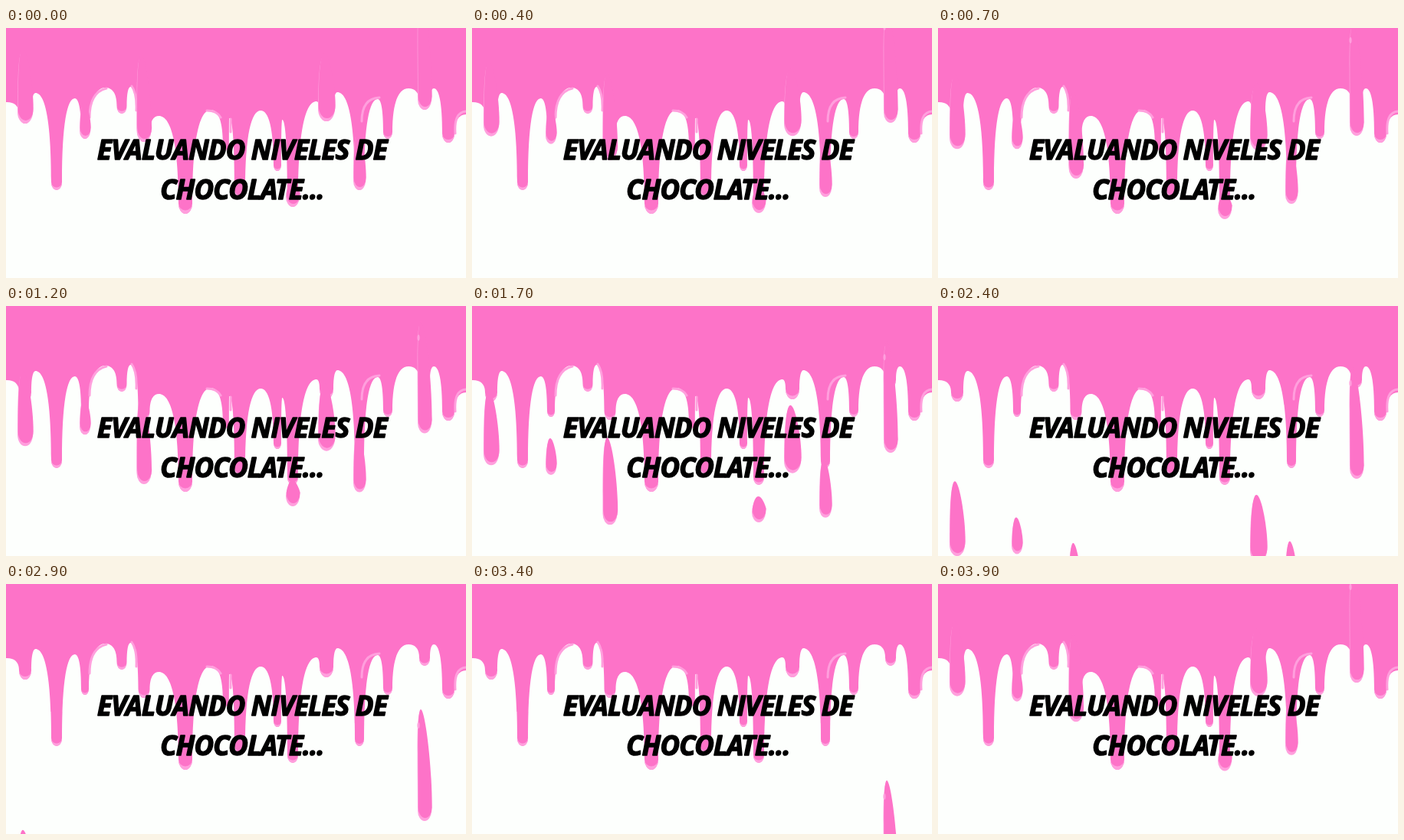
Write an HTML page that moves like this. It is 600 by 327 pixels and loops after 4000 ms.

```html
<!DOCTYPE html>
<html lang="es">
<head>
<meta charset="utf-8">
<title>Evaluando niveles de chocolate</title>
<style>
  html, body { margin: 0; width: 100%; height: 100%; overflow: hidden; background: #fdfffd; }
  svg { display: block; width: 100%; height: 100%; }
  .pink { fill: #fd73c8; }
  .light { fill: #ff9fdd; }
  .shine { fill: none; stroke: #ff9fdd; stroke-width: 3; stroke-linecap: round; }
  text {
    font: italic 700 36px "Open Sans", "Noto Sans", sans-serif;
    font-stretch: condensed;
    letter-spacing: -.02em;
    text-anchor: middle;
    stroke: #000; stroke-width: 1.6; stroke-linejoin: round;
  }
</style>
</head>
<body>
<svg viewBox="0 0 600 327">
  <path id="curtain" class="pink"/>
  <path id="glints" class="light"/>
  <path class="shine" d="M109 117Q109 84 131 79M164 76Q171 86 170 108M262 108Q275 108 280 117
    M293 119V136M464 122Q464 92 487 91M586 138Q584 110 600 109"/>
  <g id="drops"></g>
  <text x="308" y="172">EVALUANDO NIVELES DE</text>
  <text x="308" y="224">CHOCOLATE...</text>
</svg>
<script>
const LOOP = 4, CYCLE = 3.4, FPS = 6, FALL = 135, FLOOR = 327, FIRST_LINE = 378;
const $ = id => document.getElementById(id);
const mix = (a, b, k) => a + (b - a) * k;

// top of the gap before the drip, x, tip, half width; then, where a drop
// leaves the drip: its length, oozing speed and moment of release
const drips = [
  [97, -22, 125, 8],
  [97, 25, 125, 8, 94, 50, 1.7],
  [85, 66, 212, 7],
  [92, 103, 145, 5, 44, 20, 1.35],
  [78, 151, 112, 6.5],
  [77, 180, 149, 7.5, 110, 72, 1.54],
  [115, 234, 243, 9],
  [107, 287, 160, 4],
  [118, 305, 222, 7],
  [108, 354, 187, 5],
  [120, 374, 234, 7, 30, 24, 1.6],
  [96, 418, 122, 9, 85, 58, 1.75],
  [84, 461, 212, 6, 73, 27, 1.52],
  [93, 498, 145, 6],
  [79, 546, 107, 7, 142, 51, 2.4],
  [79, 577, 150, 8],
  [113, 624, 150, 8]
].map(([gap, x, tip, w, length, speed, release]) =>
  ({ gap, x, tip, w, length, speed, release, cap: tip - 1.5 * w }));

// Each gap peaks nearer to its shorter neighbour
let edge = `M${drips[0].x} 0V${drips[0].cap}`, glints = '';
drips.forEach((b, i) => {
  if (!i) return;
  const a = drips[i - 1];
  const right = a.x + a.w, left = b.x - b.w;
  const peak = (a.x + b.x) / 2 + .08 * (a.tip - b.tip);
  edge += `C${right} ${mix(b.gap, a.cap, .3)} ${mix(peak, right, .6)} ${b.gap} ${peak} ${b.gap}` +
    `C${mix(peak, left, .6)} ${b.gap} ${left} ${mix(b.gap, b.cap, .3)} ${left} ${b.cap}` +
    `A${b.w} ${1.5 * b.w} 0 0 0 ${b.x + b.w} ${b.cap}`;
  glints += `M${left} ${b.cap}a${b.w} ${1.5 * b.w} 0 0 0 ${2 * b.w} 0a${b.w} ${b.w} 0 0 1 ${-2 * b.w} 0`;
});
$('curtain').setAttribute('d', edge + 'V0Z');
$('glints').setAttribute('d', glints);

function add(parent, tag, attrs = {}) {
  const el = document.createElementNS('http://www.w3.org/2000/svg', tag);
  for (const name in attrs) el.setAttribute(name, attrs[name]);
  return parent.appendChild(el);
}

// Leaning teardrop with its lower tip at the origin
function teardrop(w, length) {
  const cap = -1.5 * w, lean = -.04 * length;
  return `M${-w} ${cap}A${w} ${-cap} 0 0 0 ${w} ${cap}` +
    `C${w} ${-length / 2} ${lean + w * .6} ${-length} ${lean} ${-length}` +
    `C${lean - w * .6} ${-length} ${-w} ${-length / 2} ${-w} ${cap}Z`;
}

const drops = drips.filter(drip => drip.length);
for (const drop of drops) {
  const d = teardrop(drop.w + 2, drop.length);
  drop.el = add($('drops'), 'g');
  add(drop.el, 'path', { class: 'light', d });
  add(drop.el, 'path', { class: 'pink', d, transform: 'translate(.7 -4)' });
  if (drop.length > 120) add(drop.el, 'ellipse', { class: 'light', cx: -8, cy: -125, rx: 1.6, ry: 4 });
}

// One font size for both lines, chosen from the width of the first
const lines = document.querySelectorAll('text');
const size = 36 * FIRST_LINE / lines[0].getComputedTextLength();
lines.forEach(line => line.style.fontSize = size + 'px');

// A drop oozes out slowly, then lets go and falls
const tipAt = ({ tip, speed, release }, t) => tip + speed * t + FALL * Math.max(0, t - release);

function frame() {
  // Poses change six times a second, on whole tenths
  const tenths = Math.floor(performance.now() / 100) % (LOOP * 10);
  const t = Math.floor(tenths * FPS / 10) / FPS;
  for (const drop of drops) {
    let y = tipAt(drop, t);
    // A new drop forms once the old one has left
    if (t >= CYCLE && y - drop.length > FLOOR) y = tipAt(drop, t - CYCLE);
    drop.el.setAttribute('transform', `translate(${drop.x} ${y})`);
  }
  requestAnimationFrame(frame);
}
frame();
</script>
</body>
</html>
```
